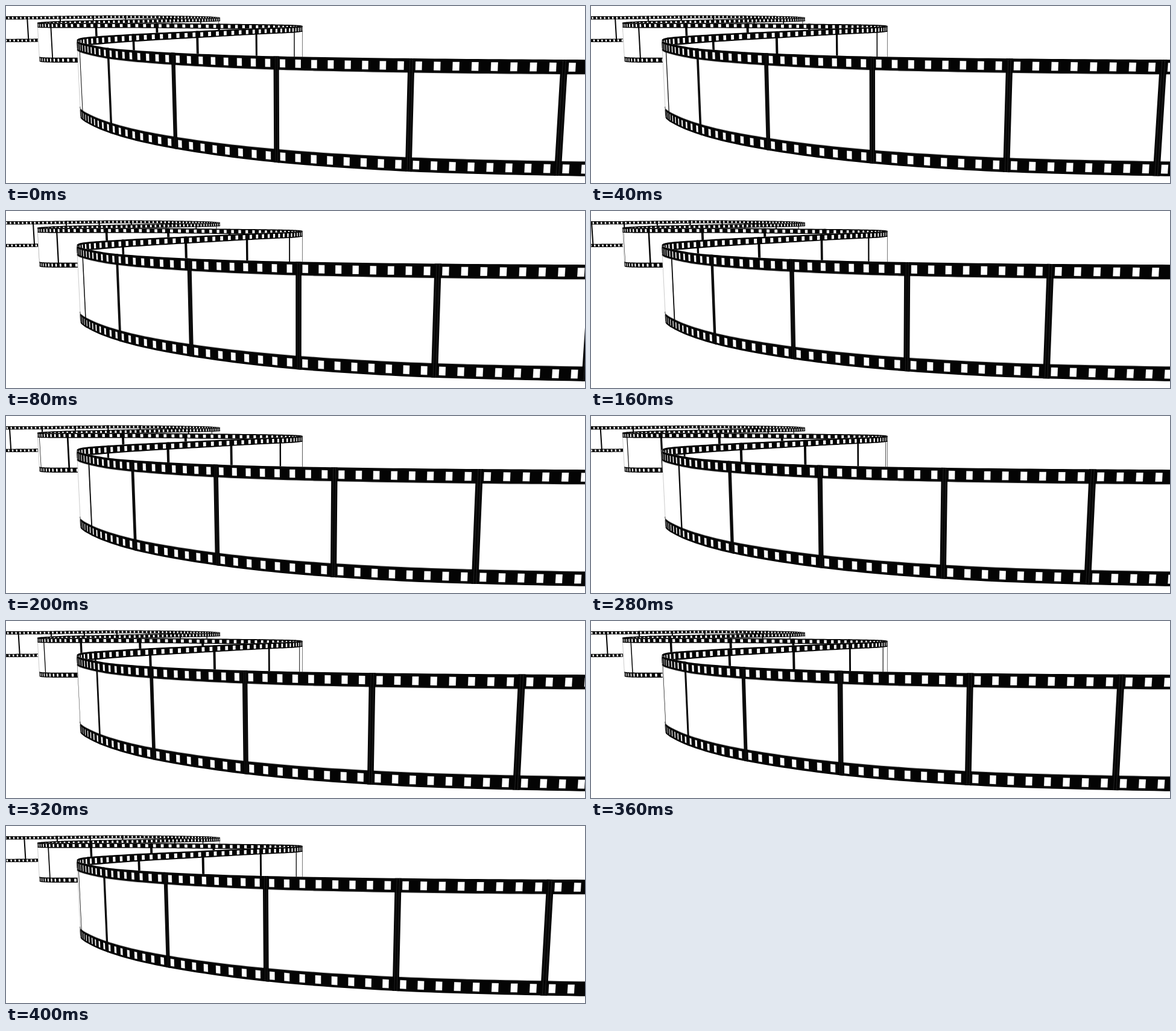
These frames come from a looping animation (960x294 px, 440 ms). An HTML page:

```html
<!DOCTYPE html>
<html lang="en">
<head>
<meta charset="utf-8">
<title>Film strip</title>
<style>
html, body { margin: 0; width: 100%; height: 100%; overflow: hidden; background: #fff; }
svg { display: block; width: 960px; height: 294px; }
</style>
</head>
<body>
<svg id="stage" viewBox="0 0 960 294"></svg>
<script>
const STEP = 40, STEPS = 11;   // one loop moves the film by one picture
const HOLES = 8, BAND = 0.125, REACH = 1.35e-4;

// Ribbon knots: position along the film in pictures, x, top y, [bottom y]
const knots = [
  [-27, -72, 17], [-25, 35, 17], [-22, 198, 15.5], [-20, 300, 16.5],
  [-19, 338, 17.5], [-18.3, 355, 19], [-17.5, 340, 20], [-16, 275, 21],
  [-14, 150, 23.5], [-13, 88, 25], [-12.4, 61, 26.5], [-11.85, 52, 27.6],
  [-11.45, 57, 28], [-11, 74, 28.2], [-10.45, 109, 28.2], [-10, 149, 28.2],
  [-9, 250, 28.5], [-8, 353, 29.5], [-7, 441, 30.5], [-6, 487, 32],
  [-5.6, 491.5, 33], [-5, 478, 34.5], [-4, 415, 37], [-3, 317, 41.5],
  [-2, 211, 46.5], [-1.45, 161, 49.5], [-1, 131, 52], [-0.45, 117.5, 56, 183],
  [0, 121.5, 60, 190], [0.364, 133, 63, 197], [0.727, 150, 66.5, 205],
  [1, 169, 69.5, 212], [1.545, 219, 74, 226], [2, 277, 77.5, 237.5],
  [3, 448, 83.5, 260], [4, 672, 87, 275], [5, 926, 89, 282], [6, 1185, 90, 285]
].map(([u, x, top, bottom = top + (top + 4) * 2.04]) => [u, x, top, bottom]);

// The ribbon folds at these positions; later pieces lie in front
const folds = [-27, -18.3, -11.85, -5.6, -0.45, 6];

const rate = (i, c) => (knots[i + 1][c] - knots[i][c]) / (knots[i + 1][0] - knots[i][0]);

function slope(i, c) {
  if (i === 0) return rate(0, c);
  if (i === knots.length - 1) return rate(i - 1, c);
  const a = knots[i][0] - knots[i - 1][0], b = knots[i + 1][0] - knots[i][0];
  return (rate(i - 1, c) * b + rate(i, c) * a) / (a + b);
}

function spline(u, c) {
  let i = 0;
  while (i < knots.length - 2 && u > knots[i + 1][0]) i++;
  const p = knots[i], q = knots[i + 1], w = q[0] - p[0], s = (u - p[0]) / w, r = 1 - s;
  return r * r * ((1 + 2 * s) * p[c] + s * w * slope(i, c)) +
         s * s * ((1 + 2 * r) * q[c] - r * w * slope(i + 1, c));
}

// Stage point at position u, share v of the way down the film
function point(u, v) {
  const x = spline(u, 1), top = spline(u, 2), h = spline(u, 3) - top;
  return (x + h * v * REACH * (480 - x)).toFixed(2) + " " + (top + h * v).toFixed(2);
}

const quad = (a, b, v, w) =>
  `M${point(a, v)}L${point(b, v)}L${point(b, w)}L${point(a, w)}Z`;

function edge(a, b, v) {
  const n = Math.ceil(Math.abs(b - a) * 14);
  return Array.from({ length: n + 1 }, (_, i) => point(a + (b - a) * i / n, v)).join("L");
}

const strip = (a, b, v, w) => `M${edge(a, b, v)}L${edge(b, a, w)}Z`;

const stage = document.getElementById("stage");

function add(attrs) {
  const el = document.createElementNS("http://www.w3.org/2000/svg", "path");
  for (const name in attrs) el.setAttribute(name, attrs[name]);
  stage.appendChild(el);
  return el;
}

const pieces = folds.slice(0, -1).map((a, i) => {
  const b = folds[i + 1], front = i === 4;
  add({ d: strip(a, b, 0, 1), fill: "#fff" });
  if (i > 1) {
    add({ d: `M${point(a, 0)}L${point(a, 1)}`, stroke: i === 3 ? "#777" : "#ccc", fill: "none" });
  }
  const bars = add({ fill: "#060606" });
  add({ d: strip(a, b, 0, BAND) + strip(a, b, 1 - BAND, 1), fill: "#040404" });
  if (front) {
    add({ d: `M${edge(a, b, BAND)}M${edge(a, b, 1 - BAND)}`, fill: "none",
          stroke: "#000", "stroke-opacity": 0.25, "stroke-width": 2 });
  }
  const holes = add({ fill: "#fff", stroke: "#000", "stroke-opacity": front ? 0.3 : 0 });
  const shine = front ? add({ fill: "#262626" }) : null;
  return { a, b, bars, holes, shine };
});

function draw(time) {
  const shift = Math.floor(time / STEP) % STEPS / STEPS;
  for (const { a, b, bars, holes, shine } of pieces) {
    let barPath = "", holePath = "", shinePath = "";
    const bar = (u, half) => quad(Math.max(a, u - half), Math.min(b, u + half), 0, 1);
    for (let n = Math.floor(a) - 1; n <= b; n++) {
      const u = n + shift;
      if (u > a && u < b) {
        barPath += bar(u, shine ? 0.023 : 0.019);
        if (shine) shinePath += bar(u - 0.009, 0.0018) + bar(u + 0.009, 0.0018);
      }
      for (let i = 0; i < HOLES; i++) {
        const h = u + (i + 0.42) / HOLES, l = h - 0.023, r = h + 0.023;
        if (l < a || r > b) continue;
        holePath += quad(l, r, 0.026, 0.104) + quad(l, r, 0.901, 0.979);
      }
    }
    bars.setAttribute("d", barPath);
    holes.setAttribute("d", holePath);
    if (shine) shine.setAttribute("d", shinePath);
  }
}

const start = performance.now();
function tick() {
  draw(performance.now() - start);
  requestAnimationFrame(tick);
}
tick();
</script>
</body>
</html>
```
